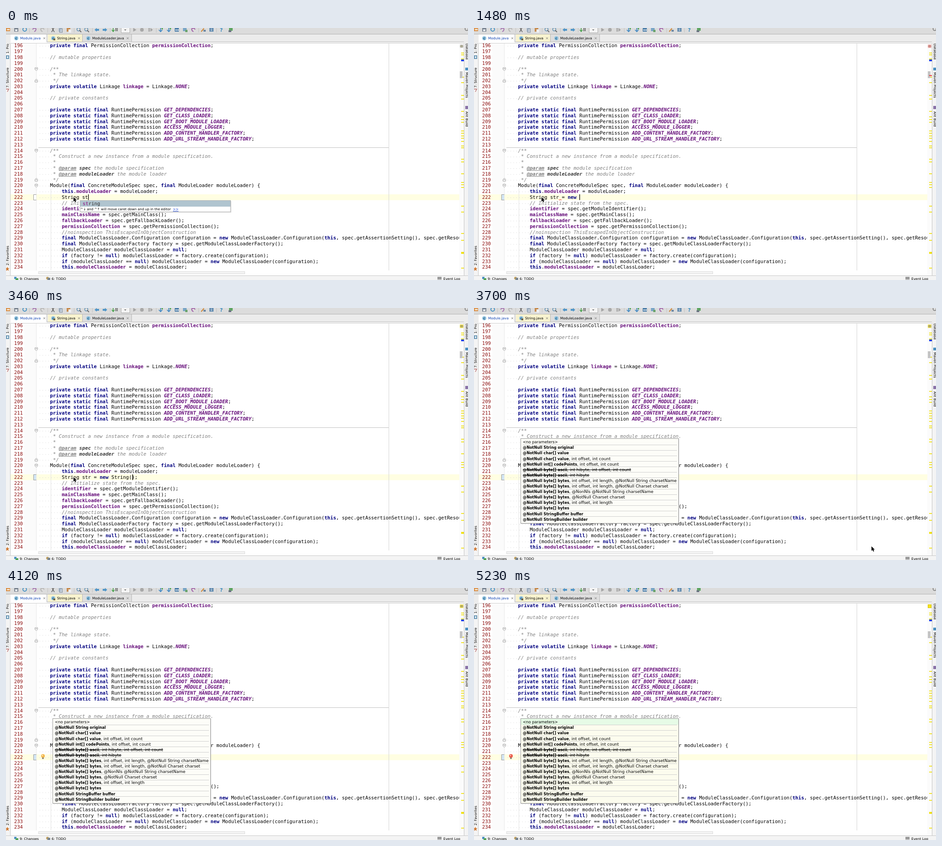
An HTML page with a canvas that plays this animation: 1013 px wide and 553 px high, repeating every 5940 ms.

```html
<!DOCTYPE html>
<html lang="en">
<head>
<meta charset="utf-8">
<title>Parameter info in a Java editor</title>
<style>
  html, body { margin: 0; width: 100%; height: 100%; overflow: hidden; background: #fff; }
  canvas { display: block; width: 1013px; height: 553px; }
</style>
</head>
<body>
<canvas id="stage" width="1013" height="553"></canvas>
<script>
const g = document.getElementById('stage').getContext('2d');
const LOOP = 5940;
const CW = 6.4, ROW = 12.79, X0 = 71, FIRST = 196, CARET_ROW = 222;
const MONO = '10.63px "DejaVu Sans Mono", monospace';
const UI = '"DejaVu Sans", sans-serif';
const NAVY = '#000080', PURPLE = '#660e7a', GRAY = '#808080', RED = '#f02020', YELLOW = '#f0e000';

// ~name~ marks a field
const CODE = `
    private final PermissionCollection ~permissionCollection~;

    // mutable properties

    /**
     * The linkage state.
     */
    private volatile Linkage ~linkage~ = Linkage.NONE;

    // private constants

    private static final RuntimePermission GET_DEPENDENCIES;
    private static final RuntimePermission GET_CLASS_LOADER;
    private static final RuntimePermission GET_BOOT_MODULE_LOADER;
    private static final RuntimePermission ACCESS_MODULE_LOGGER;
    private static final RuntimePermission ADD_CONTENT_HANDLER_FACTORY;
    private static final RuntimePermission ADD_URL_STREAM_HANDLER_FACTORY;

    /**
     * Construct a new instance from a module specification.
     *
     * @param spec the module specification
     * @param moduleLoader the module loader
     */
    Module(final ConcreteModuleSpec spec, final ModuleLoader moduleLoader) {
        this.~moduleLoader~ = moduleLoader;

        // Initialize state from the spec.
        ~identifier~ = spec.getModuleIdentifier();
        ~mainClassName~ = spec.getMainClass();
        ~fallbackLoader~ = spec.getFallbackLoader();
        ~permissionCollection~ = spec.getPermissionCollection();
        //noinspection ThisEscapedInObjectConstruction
        final ModuleClassLoader.Configuration configuration = new ModuleClassLoader.Configuration(this, spec.getAssertionSetting(), spec.getResourceLoaders());
        final ModuleClassLoaderFactory factory = spec.getModuleClassLoaderFactory();
        ModuleClassLoader moduleClassLoader = null;
        if (factory != null) moduleClassLoader = factory.create(configuration);
        if (moduleClassLoader == null) moduleClassLoader = new ModuleClassLoader(configuration);
        this.~moduleClassLoader~ = moduleClassLoader;`.split('\n').slice(1);

const TYPED = [
  [0, 'String st'], [150, 'String str'], [380, 'String str '], [950, 'String str ='],
  [1130, 'String str = n'], [1340, 'String str = ne'], [1480, 'String str = new '],
  [1860, 'String str = new S'], [2540, 'String str = new Str'], [2840, 'String str = new String();']
];

// bold part | plain part
const PARAMS = [
  '|<no parameters>', 'String original|', 'char[] value|', 'char[] value|, int offset, int count',
  'int[] codePoints|, int offset, int count', 'byte[] ascii|, int hibyte, int offset, int count',
  'byte[] ascii|, int hibyte', 'byte[] bytes|, int offset, int length, @NotNull String charsetName',
  'byte[] bytes|, int offset, int length, @NotNull Charset charset',
  'byte[] bytes|, @NonNls @NotNull String charsetName', 'byte[] bytes|, @NotNull Charset charset',
  'byte[] bytes|, int offset, int length', 'byte[] bytes|', 'StringBuffer buffer|', 'StringBuilder builder|'
];

const MARKS = [55, 59, 68, 108, 120, 148, 156, 183, 195, 201, 207, 226, 231, 237, 242, 249, 259, 263,
  288, 294, 320, 339, 344, 350, 391, 404, 451, 466, 527];

const rowTop = n => 365 + (n - CARET_ROW) * ROW;
const colX = col => X0 + col * CW;
const within = (t, a, b) => t >= a && t < b;

function rect(x, y, w, h, color) { g.fillStyle = color; g.fillRect(x, y, w, h); }

function box(x, y, w, h, color) { g.strokeStyle = color; g.lineWidth = 1; g.strokeRect(x + .5, y + .5, w, h); }

function disc(x, y, r, color) { g.fillStyle = color; g.beginPath(); g.arc(x, y, r, 0, 7); g.fill(); }

function path(points, color, width) {
  g.beginPath();
  for (let i = 0; i < points.length; i += 2) g.lineTo(points[i], points[i + 1]);
  if (width) { g.strokeStyle = color; g.lineWidth = width; g.stroke(); }
  else { g.fillStyle = color; g.closePath(); g.fill(); }
}

function text(s, x, y, font, color) {
  g.font = font;
  g.fillStyle = color;
  g.fillText(s, x, y);
  return g.measureText(s).width;
}

const ui = (s, x, y, color = '#000', size = 7.45, weight = '') => text(s, x, y, `${weight} ${size}px ${UI}`, color);

function sideText(s, x, y, turn) {
  g.save();
  g.translate(x, y);
  g.rotate(turn * Math.PI / 2);
  ui(s, 0, 0);
  g.restore();
}

function wave(x, end, y) {
  const pts = [];
  for (let i = 0; x + i * 2 <= end; i++) pts.push(x + i * 2, y + (i % 2 ? 1 : -1));
  path(pts, RED, 1);
}

function codeLine(line, y) {
  const start = line.search(/\S/);
  if (start < 0) return;
  for (let i = 0; i < start; i++) rect(colX(i) + 2.7, y - 3, 1, 1, '#c9c9c9');
  const isNote = /^\s*(\/\/|\/\*|\*)/.test(line);
  const rule = isNote
    ? /(@param)( \w+)/
    : /(~\w+~)|\b(private|final|static|volatile|this|new|null|if)\b|\b([A-Z]+(?:_[A-Z]+)+|NONE)\b/;
  let col = start;
  const put = (s, style, color) => {
    text(s, colX(col), y, style + ' ' + MONO, color);
    col += s.length;
  };
  let rest = line.slice(start), m;
  while ((m = rule.exec(rest))) {
    put(rest.slice(0, m.index), isNote ? 'italic' : '', isNote ? GRAY : '#000');
    if (isNote) {
      rect(colX(col), y + 1.3, 6 * CW, 1, GRAY);
      put(m[1], 'italic bold', GRAY);
      put(m[2], 'italic bold', '#3d3d3d');
    } else if (m[1]) put(m[1].slice(1, -1), 'bold', PURPLE);
    else if (m[2]) put(m[2], 'bold', NAVY);
    else put(m[3], 'italic bold', PURPLE);
    rest = rest.slice(m.index + m[0].length);
  }
  put(rest, isNote ? 'italic' : '', isNote ? GRAY : '#000');
}

function toolbar() {
  rect(0, 0, 1013, 14, '#dcdcdc');
  rect(0, 13, 1013, 1, '#b4b4b4');
  rect(0, 0, 9, 7, '#d9904a'); rect(2, 2, 6, 3, '#f3dfc4');
  rect(18, 0, 9, 8, '#7d8794'); rect(20, 3, 5, 4, '#e8ecf0');
  g.strokeStyle = '#3f8fc4'; g.lineWidth = 1.8;
  g.beginPath(); g.arc(41, 3, 4, 0, 7); g.stroke();
  const curl = (x, d, color) => path([x - 4 * d, 3, x, 0, x + 4 * d, 2, x + 3 * d, 6, x, 8], color, 1.8);
  curl(62, 1, '#a06cae'); curl(80, -1, '#b3b3b3');
  path([100, 9, 105, 0], '#555', 1.4); path([106, 9, 101, 0], '#555', 1.4);
  rect(115, 0, 7, 8, '#b9c7d6'); box(117, 1, 6, 8, '#77889a');
  rect(133, 0, 8, 8, '#c78d52'); rect(137, 3, 6, 7, '#eef0f4');
  for (const x of [159, 176]) {
    g.strokeStyle = '#5c8fb5'; g.lineWidth = 1.5;
    g.beginPath(); g.arc(x, 3, 3.5, 0, 7); g.stroke();
    path([x + 2, 5, x + 6, 9], '#6b6b6b', 2);
  }
  const arrow = (x, d) => path([x - 5 * d, 4, x, 0, x, 2, x + 5 * d, 2, x + 5 * d, 6, x, 6, x, 8], '#4d94c8');
  arrow(199, 1); arrow(217, -1);
  path([235, 0, 235, 7], '#43a047', 1.5); path([232, 4, 235, 8, 238, 4], '#43a047', 1.4);
  rect(240, 0, 1.5, 7, '#555'); rect(243, 0, 1.5, 7, '#555');
  rect(252, 0, 19, 10, '#f4f4f4'); box(252, -2, 19, 12, '#adadad');
  path([259, 3, 264, 3, 261.5, 6], '#777');
  path([279, 0, 286, 4, 279, 8], '#a3a3a3');
  disc(298, 4, 4, '#a8a8a8');
  rect(312, 0, 4, 8, '#b3b3b3'); path([317, 0, 322, 4, 317, 8], '#a3a3a3');
  for (const x of [339, 357]) {
    path([x, 0, x, 7], '#3d86c0', 1.8); path([x - 4, 4, x, 8, x + 4, 4], '#3d86c0', 1.6);
    rect(x + 2, 0, 3, 3, '#58a85c');
  }
  rect(370, 0, 9, 8, '#4d7faa'); rect(372, 3, 2, 3, '#fff'); rect(376, 3, 2, 3, '#fff');
  rect(388, 0, 8, 7, '#7aa6c8'); rect(393, 4, 5, 5, '#6ba36d');
  curl(411, -1, '#9c55a4');
  path([428, 8, 434, 1], '#d08a3c', 2.2); rect(433, 4, 5, 4, '#6d88a3');
  rect(446, 0, 9, 8, '#628bb0'); rect(449, 2, 3, 1, '#fff'); rect(449, 5, 3, 1, '#fff');
  text('?', 469, 8, 'bold 11px ' + UI, '#3a8cc0');
  rect(489, 0, 8, 6, '#5fa564'); rect(488, 5, 6, 4, '#6c7682');
  for (const x of [51, 91, 149, 189, 228, 329, 422, 461]) rect(x, 0, 1, 10, '#c4c4c4');
  g.strokeStyle = '#777'; g.lineWidth = 1.5;
  g.beginPath(); g.arc(1010, 2, 3.5, 0, 7); g.stroke();
}

function tab(x, w, label, labelX, bg, color) {
  rect(x, 14, w, 16, bg);
  rect(x + w, 14, 1, 16, '#b8b8b8');
  const cx = labelX - 8.5;
  disc(cx, 22.5, 4.5, '#8fc1de');
  ui('c', cx - 2.2, 25, '#245b80', 7.5, 'bold');
  const end = labelX + ui(label, labelX, 25.3, color) + 6;
  path([end, 20.5, end + 4, 24.5], '#777', 1);
  path([end + 4, 20.5, end, 24.5], '#777', 1);
}

function tabs(t) {
  rect(0, 14, 1013, 20, '#ececec');
  rect(10, 30, 994, 1, '#b9b9b9');
  rect(10, 31, 994, 3, '#f8f8f8');
  rect(10, 33, 994, 1, '#cecece');
  tab(10, 79, 'Module.java', 31, '#fff', '#0b3fb0');
  rect(10, 30, 79, 3, '#fff');
  tab(92, 75, 'String.java', 112, '#f8f3cf', '#000');
  tab(168, 107, 'ModuleLoader.java', 189, '#dedede', '#000');
  rect(104, 23, 4, 4, '#75653e');
  if (within(t, 2390, 3460)) wave(31, 76, 28);
}

function frameBars() {
  rect(0, 14, 10, 539, '#f4f4f4');
  rect(1004, 14, 9, 539, '#f4f4f4');
  rect(9, 14, 1, 530, '#c4c4c4');
  rect(1004, 34, 1, 510, '#c4c4c4');
  rect(0, 543, 1013, 10, '#f4f4f4');
  rect(0, 543, 1013, 1, '#c8c8c8');
  sideText('1: Project', 5.6, 56, -1);
  rect(0, 60, 7, 8, '#6b97b5'); rect(2, 62, 3, 4, '#e5eef4');
  sideText('7: Structure', 5.6, 131, -1);
  path([0, 134, 6, 134, 3, 140], '#b86a6a', 1.4);
  sideText('2: Favorites', 5.6, 521, -1);
  path([3, 524, 4.3, 527, 7.5, 527, 5, 529, 6, 533, 3, 531, 0, 533, 1, 529, -1, 527, 1.7, 527], '#cf7a36');
  rect(1007, 23, 6, 7, '#8099ad'); rect(1009, 25, 4, 3, '#e3e9ee');
  sideText('Database', 1008, 34, 1);
  rect(1007, 87, 6, 6, '#4b8fc0');
  sideText('Maven Projects', 1008, 97, 1);
  rect(1007, 171, 6, 7, '#8a74a8');
  sideText('Ant Build', 1008, 183, 1);
  rect(18, 546, 5, 5, '#4d91c6'); rect(21, 549, 6, 4, '#56a35b');
  ui('9: Changes', 30, 552.5);
  disc(91, 549, 3, '#c2a05c'); rect(91, 548, 6, 5, '#7b8791');
  ui('6: TODO', 100, 552.5);
  rect(946, 546, 9, 6, '#9a9a9a');
  ui('Event Log', 959, 552.5);
}

function foldMark(n, up) {
  const y = rowTop(n) + 6.5, d = up ? -1 : 1;
  const pts = [63.5, y - 3 * d, 69.5, y - 3 * d, 69.5, y + d, 66.5, y + 3.5 * d, 63.5, y + d, 63.5, y - 3 * d];
  path(pts, '#fff');
  path(pts, '#a0a0a0', 1);
  path([65, y - .5, 68, y - .5], '#888', 1);
}

function errorStripe(t) {
  rect(994, 34, 10, 509, '#fbfbfb');
  for (const y of MARKS) rect(998, y - 1, 6, 1.7, YELLOW);
  rect(998, 491.5, 6, 4, YELLOW);
  rect(998, 69, 6, 4, '#1b3fe0');
  rect(995, 95, 6, 15, '#c5c5c5');
  if (within(t, 1340, 3050)) rect(998, 103.5, 6, 1.7, RED);
  if (within(t, 1860, 3050)) rect(998, 87, 6, 8, '#ff2a12');
  if (t >= 4780) {
    rect(995, 36, 8, 8, '#f6e21c');
    box(995, 36, 7, 7, '#d6c400');
    return;
  }
  const bad = within(t, 800, 3050);
  rect(995, 36, 8, 8, bad ? '#f4c9c5' : t >= 3050 ? '#f4e66a' : '#dedede');
  g.strokeStyle = bad ? '#b05a54' : '#85805a';
  g.lineWidth = 1;
  g.beginPath(); g.ellipse(999, 40, 3, 2, 0, 0, 7); g.stroke();
  disc(999, 40, 1, g.strokeStyle);
}

function editor(t) {
  const typed = TYPED.filter(e => e[0] <= t).pop()[1];
  g.save();
  g.beginPath(); g.rect(10, 34, 984, 509); g.clip();
  rect(10, 34, 984, 509, '#fff');
  rect(40, 34, 26, 498, '#fbfbfb');
  rect(10, 365, 984, 12.8, '#fffee2');
  rect(66, 34, 1, 498, '#e6e6e6');
  rect(839, 34, 1, 498, '#d4d4d4');
  rect(71, 262, 768, 1, '#c0c0c0');
  rect(98, 352, 1, 180, '#e2e2e2');
  CODE.forEach((line, i) => {
    const n = FIRST + i, y = rowTop(n) + 9.9;
    text(String(n), 17.8, y, MONO, '#8c0d0d');
    codeLine(n === CARET_ROW ? ' '.repeat(8) + typed : line, y);
  });
  foldMark(200); foldMark(202, true); foldMark(214); foldMark(219, true); foldMark(220);
  rect(60, 365, 6, 12, t < 380 ? '#fff' : '#d3e6f5');
  path([66.5, 365.5, 60.5, 365.5, 60.5, 377.5, 66.5, 377.5], '#999', 1);
  if (within(t, 800, 1860)) wave(186, 193, 377);
  if (within(t, 1860, 3050)) {
    wave(97, 449, 44.5);
    wave(186, 193, 402.5);
  }
  const caret = colX(8 + typed.length - (t >= 2840 ? 2 : 0));
  rect(Math.round(caret) + (t >= 2840 ? 1 : 0), 365, 1.3, 12.5, '#000');
  rect(71, 534, 453, 6, '#f4f4f4');
  box(71, 534, 452, 5, '#dadada');
  g.restore();
}

function completion(x, word, hits) {
  rect(x + 2, 380, 330, 25, 'rgba(0,0,0,.14)');
  rect(x, 378, 330, 25.5, '#fff');
  rect(x, 378, 330, 14, '#b0c4cf');
  box(x, 378, 330, 25, '#b3b3b3');
  text(word, x + 6, 388.7, MONO, '#333');
  text(word.slice(0, hits), x + 6, 388.7, MONO, '#b43cb4');
  ui('^↓ and ^↑ will move caret down and up in the editor', x + 1, 400.4, '#000', 7.34);
  const w = ui('>>', x + 204, 400.4, '#1540d8', 7.34);
  rect(x + 204, 401.5, w, 1, '#1540d8');
}

function paramInfo(t) {
  rect(103, 287, 347, 187, 'rgba(0,0,0,.12)');
  rect(102, 286, 347, 187, t >= 4780 ? '#fcfcee' : '#fdfdf8');
  if (t >= 4780) rect(103, 287, 345, 13, '#e6fbe6');
  PARAMS.forEach((row, i) => {
    const [name, rest] = row.split('|'), y = 297.2 + i * 12.1;
    let x = 107;
    if (name) x += ui('@NotNull ' + name, x, y, '#000', 8.17, 'bold');
    x += ui(rest, x, y, '#000', i ? 9 : 8.5);
    if (i === 5 || i === 6) rect(107, y - 3.3, x - 107, 1, '#000');
    if (i < 14) rect(107, Math.round(y + 2.6), 338, 1, '#cfcfcf');
  });
  box(102, 286, 346, 186, '#999');
}

function bulb(color) {
  disc(81, 368.5, 4, color);
  disc(80, 367.5, 1.5, 'rgba(255,255,255,.6)');
  rect(79.3, 372, 3.4, 3.2, '#85796c');
}

function pointer(x, y) {
  const p = [0, 0, 0, 10, 2.3, 7.9, 4, 11.6, 5.8, 10.8, 4.2, 7.2, 7.2, 7.2, 0, 0].map((v, i) => v + (i % 2 ? y : x));
  path(p, '#fff', 1.6);
  path(p, '#000');
}

function draw(t) {
  editor(t);
  errorStripe(t);
  frameBars();
  toolbar();
  tabs(t);
  if (t < 380) completion(162, 'string', 2);
  if (within(t, 1860, 2840)) completion(226, 'String', 1);
  if (within(t, 2390, 2540)) bulb('#e84a3c');
  if (t >= 3700) paramInfo(t);
  if (t >= 3910) bulb(t < 5230 ? '#f4b84a' : '#ec5a48');
  if (t < 3700) pointer(148, 371);
  else if (t < 3910) pointer(871.5, 523);
  else if (t < 4120) pointer(936, 543);
}

const begin = performance.now();
function tick() {
  draw((performance.now() - begin) % LOOP);
  requestAnimationFrame(tick);
}
tick();
</script>
</body>
</html>
```
